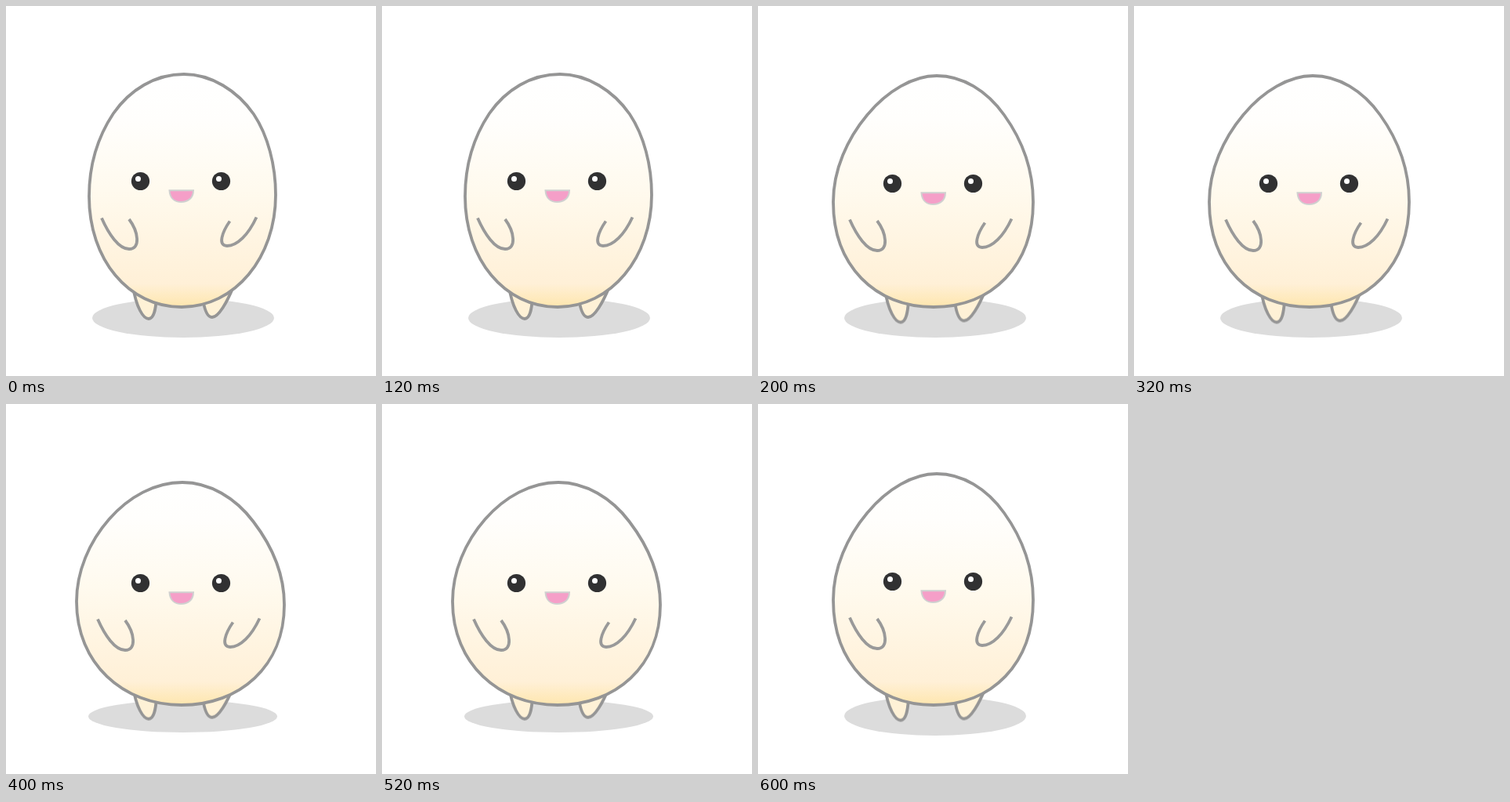
These frames come from a looping animation (472x472 px, 0.8 s). An HTML page:

```html
<!DOCTYPE html>
<html lang="en">
<head>
<meta charset="utf-8">
<title>Bouncing egg</title>
<style>
  html, body { margin: 0; width: 100%; height: 100%; overflow: hidden; background: #fff; }
  svg { display: block; width: 100vw; height: 100vh; }

  .move { animation: 800ms step-end infinite; }
  .line { fill: none; stroke: #959595; stroke-width: 3.8; }

  #shadow { fill: #dcdcdc; animation-name: shadow; }
  #legs { fill: #fef1d6; animation-name: legs; }
  #body { fill: url(#shell); animation-name: body; }
  #armL { stroke: #999; animation-name: armL; }
  #armR { stroke: #999; animation-name: armR; }
  #face { animation-name: face; }

  @keyframes shadow {
    0%, 75% { cx: 226px; cy: 398px; rx: 116px; ry: 25px; }
    50% { cx: 225.5px; cy: 398.5px; rx: 120.5px; ry: 20.5px; }
  }
  @keyframes legs {
    0% { transform: none; }
    25%, 75% { transform: translateY(4.5px); }
    50% { transform: translateY(2.7px); }
  }
  @keyframes body {
    0% { d: path("M227 87 C262 87 295 108 316 138 C334 165 344 203 344 241 C344 321 292 384 224 384 C156 384 106 323 106 243 C106 203 117 167 137 137 C158 107 190 87 227 87 Z"); }
    25%, 75% { d: path("M228 89 C261 89 292 108 314 139 C337 171 351 209 351 250 C351 331 299 384 224 384 C149 384 96 331 96 250 C96 209 114 169 139.5 138.7 C165 108 198 89 228 89 Z"); }
    50% { d: path("M225 100 C260 100 293 120 315.5 150 C340 182 355 219 355 256 C355 335 298 384 224 384 C149 384 90 331 90 252 C90 214 106 176 131.5 147 C157 118 190 100 225 100 Z"); }
  }
  @keyframes armL {
    0% { transform: none; }
    25%, 75% { transform: translate(-5px, 2px); }
    50% { transform: translate(-5px, 4px); }
  }
  @keyframes armR {
    0% { transform: none; }
    25%, 75% { transform: translate(4px, 2px); }
    50% { transform: translate(4px, 4px); }
  }
  @keyframes face {
    0% { transform: none; }
    25%, 75% { transform: translateY(3px); }
    50% { transform: translateY(5px); }
  }
</style>
</head>
<body>
<svg viewBox="0 0 472 472">
  <defs>
    <linearGradient id="shell" gradientUnits="userSpaceOnUse" x1="0" y1="87" x2="0" y2="384">
      <stop offset="0" stop-color="#fff"/>
      <stop offset=".2" stop-color="#fffefc"/>
      <stop offset=".5" stop-color="#fffaee"/>
      <stop offset=".9" stop-color="#fff0d7"/>
      <stop offset="1" stop-color="#fee6ae"/>
    </linearGradient>
    <g id="eye">
      <circle r="11.6" fill="#313132"/>
      <circle cx="-3" cy="-3" r="3.5" fill="#fff"/>
    </g>
  </defs>

  <ellipse id="shadow" class="move" cx="226" cy="398" rx="116" ry="25"/>

  <g id="legs" class="move line">
    <path d="M162 358 C166 384 175 399 182 399 C189 399 191 386 192 372"/>
    <path d="M251 372 C253 388 257 397 263 397 C271 397 282 378 290 358"/>
  </g>

  <path id="body" class="move line" d="M227 87 C262 87 295 108 316 138 C334 165 344 203 344 241 C344 321 292 384 224 384 C156 384 106 323 106 243 C106 203 117 167 137 137 C158 107 190 87 227 87 Z"/>

  <path id="armL" class="move line" d="M122 270.5 C131 291 144 310 157 310 C172 310 169 288 157 272"/>
  <path id="armR" class="move line" d="M319.5 269.5 C309 292 295 306 282 306 C269.5 306 276 288 285.5 274.5"/>

  <g id="face" class="move">
    <use href="#eye" x="171.5" y="223.5"/>
    <use href="#eye" x="274.5" y="223.5"/>
    <path d="M208.5 235.2 H239 C239 245 232 250 223.5 250 C215 250 209 245 208.5 235.2 Z" fill="#f59fc8" stroke="#d0d0d0" stroke-width="2"/>
  </g>
</svg>
</body>
</html>
```
